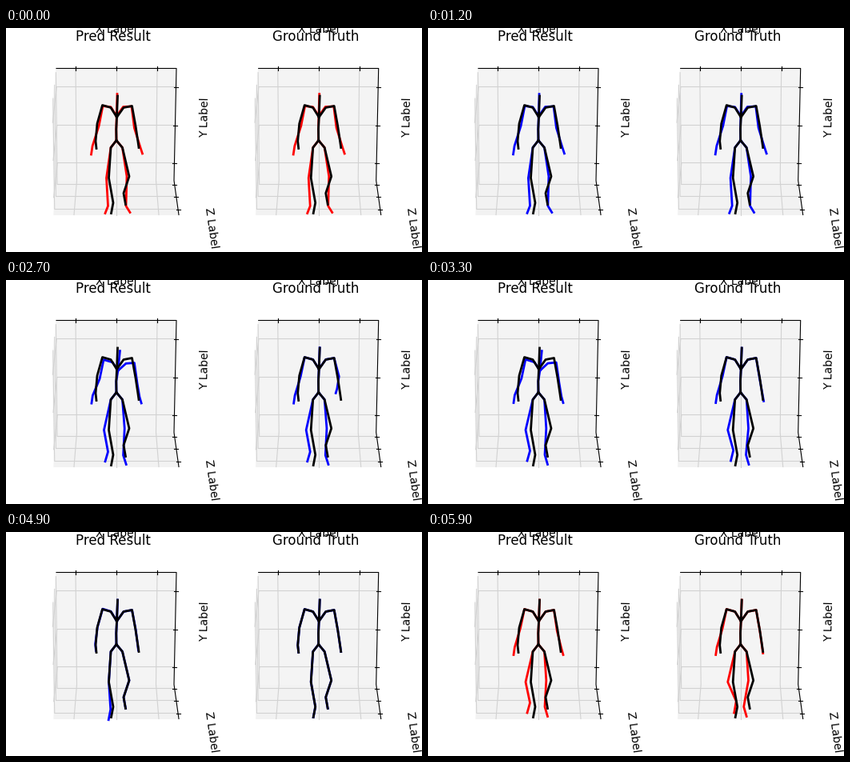
Write a matplotlib script that moves like this. It is 520x280 px and loops after 6 s.

```python
import numpy as np
import matplotlib.pyplot as plt
from matplotlib.animation import FuncAnimation

W, H, DPI = 520, 280, 100
FRAMES, STEP_MS = 60, 100
SHIFT = 252.7  # distance between the two panels

plt.rcParams["font.family"] = "DejaVu Sans"
fig = plt.figure(figsize=(W / DPI, H / DPI), dpi=DPI, facecolor="white")
ax = fig.add_axes([0, 0, 1, 1])
ax.set_xlim(-1, W - 1)
ax.set_ylim(H - 0.5, -0.5)
ax.axis("off")

# Resting skeleton, in pixels of the left panel
REST = {
    "head": (138.5, 84.5), "chest": (137.5, 111), "waist": (136.8, 126),
    "pelvis": (137, 140),
    "l_neck": (130, 99), "l_shoulder": (119.5, 96), "l_elbow": (113, 119),
    "l_wrist": (111, 141), "l_hand": (112, 150),
    "r_neck": (146, 99), "r_shoulder": (156.5, 97), "r_elbow": (161, 122),
    "r_wrist": (164, 142), "r_hand": (165, 149),
    "l_hip": (130, 149), "l_knee": (127.5, 187), "l_ankle": (133, 218),
    "l_foot": (130.5, 231),
    "r_hip": (144.5, 149), "r_knee": (153, 185), "r_ankle": (146, 206),
    "r_foot": (148.5, 220),
}

CHAINS = [["head", "chest", "waist", "pelvis"]]
for s in "lr":
    CHAINS.append(["chest"] + [f"{s}_{j}" for j in
                               ("neck", "shoulder", "elbow", "wrist", "hand")])
    CHAINS.append(["pelvis"] + [f"{s}_{j}" for j in
                                ("hip", "knee", "ankle", "foot")])

# Gestures: how far each joint moves from rest at full strength
STAND = dict(head=(-.5, -2.5), l_shoulder=(.5, 1), r_shoulder=(-.5, .5),
             l_hand=(-6.5, 7.5), r_hand=(4.5, 7.5),
             l_knee=(-3, 0), l_ankle=(-6.5, 4), l_foot=(-7.5, 0),
             r_knee=(-3, 0), r_ankle=(3, 16), r_foot=(5.5, 10))
STRIDE = dict(l_hand=(-6, 3), r_hand=(3, 4),
              l_knee=(-6.5, 0), l_ankle=(-6.5, -5), l_foot=(-7.5, -5.5),
              r_knee=(-6.2, 0), r_ankle=(-1, 12), r_foot=(0, 10))
LEAN = dict(head=(3, 4), l_shoulder=(1.5, 3), r_shoulder=(3, 6))
RAISE = dict(l_shoulder=(2.5, -3.5), l_hand=(-5, -19), r_hand=(-5, -13))
DROP = dict(l_ankle=(-5, 5), l_foot=(-5, 5))
SWING = dict(r_hand=(-10, -13))
CLOSE = dict(r_hand=(-3, -2), l_ankle=(5, -2), l_foot=(6, 0),
             r_ankle=(-4, 0), r_foot=(-4, 0))


def ramp(t, a, b):
    u = np.clip((t - a) / (b - a), 0, 1)
    return u * u * (3 - 2 * u)


def bump(t, mid, half):
    u = np.clip((t - mid) / half, -1, 1)
    return (1 + np.cos(np.pi * u)) / 2


def enter(t):
    return min(t / 28, 1) ** 4


def stride(t):
    return enter(t) * (1 - ramp(t, 35, 49)) + ramp(t, 49, 59)


SHARED = [(STAND, lambda t: 1 - enter(t)), (STRIDE, stride)]
PRED = SHARED + [
    (LEAN, lambda t: ramp(t, 21, 27) * (1 - ramp(t, 30, 48))),
    (RAISE, lambda t: bump(t, 42, 9)),
    (DROP, lambda t: bump(t, 45, 10)),
]
TRUTH = SHARED + [
    (SWING, lambda t: bump(t, 26, 9)),
    (CLOSE, lambda t: ramp(t, 29, 40) * stride(t)),
]


def pose(gestures, t):
    move = {name: np.zeros(2) for name in REST}
    for shifts, strength in gestures:
        for name, d in shifts.items():
            move[name] += strength(t) * np.array(d)
    # The remaining upper joints follow the head, shoulders and hands
    move["chest"] = move["head"] / 2
    for s in "lr":
        shoulder, hand = move[f"{s}_shoulder"], move[f"{s}_hand"]
        move[f"{s}_neck"] = (shoulder + move["head"]) / 2
        move[f"{s}_elbow"] = shoulder + hand * (-0.25, 0.25)
        move[f"{s}_wrist"] = hand * (0.6, 0.8)
    return {name: p + move[name] for name, p in REST.items()}


def skeleton(color, z):
    return [ax.plot([], [], color=color, lw=2, zorder=z,
                    solid_joinstyle="round")[0] for _ in CHAINS]


def place(lines, joints, dx):
    for line, chain in zip(lines, CHAINS):
        pts = np.array([joints[name] for name in chain])
        line.set_data(pts[:, 0] + dx, pts[:, 1])


def room(dx, title):
    """The static box: panes, grid, axes, ticks and labels."""
    def stroke(*pts, color="#d2d2d2", z=2):
        x, y = zip(*pts)
        ax.plot(np.array(x) + dx, y, color=color, lw=0.8, zorder=z)

    def fill(color, *pts):
        ax.fill([x + dx for x, _ in pts], [y for _, y in pts],
                color=color, lw=0.8, zorder=1)

    def label(x, y, text, size=10, **kw):
        ax.text(x + dx, y, text, size=size, ha="center", zorder=6, **kw)

    def grid_row(side, left, right, y):
        stroke(side, (left, y), (right, y))
        stroke((right - 2.5, y), (right + 2.5, y), color="black", z=3)

    fill("#f8f8f8", (62, 50), (57, 95), (59, 233), (63.5, 190))
    fill("#f2f2f2", (63.5, 190), (209, 190), (215, 233), (59, 233))
    fill("#f4f4f4", (62, 50), (212, 50), (209, 190), (63.5, 190))

    for k in (-1, 0, 1):
        top = 137 + 51 * k
        stroke((top, 50), (137 + 49.5 * k, 190), (137 + 53 * k, 233))
        stroke((top, 47.5), (top, 52.5), color="black", z=3)
    for y in (73, 121, 168):
        k = (y - 50) / 140
        grid_row((57 + 2 * k, 95 + 138 * k), 62 + 1.5 * k, 212 - 3 * k, y)
    for y in (195, 210, 226):
        k = (y - 190) / 43
        grid_row((62 - 5 * k, 50 + 45 * k), 63.5 - 4.5 * k, 209 + 6 * k, y)
    stroke((62, 50), (212, 50), (209, 190), (215, 233), color="black", z=3)

    label(133.2, 16, title, size=12, va="baseline")
    label(137, 6, "X Label", va="baseline")
    label(247.6, 111, "Y Label", rotation=88.8, va="center")
    label(255.2, 249.5, "Z Label", rotation=-82, va="center")


panels = []
for dx, title, gestures in ((0, "Pred Result", PRED),
                            (SHIFT, "Ground Truth", TRUTH)):
    room(dx, title)
    place(skeleton("black", 5), REST, dx)
    panels.append((skeleton("red", 4), gestures, dx))


def update(i):
    color = "blue" if 10 <= i < 50 else "red"
    for lines, gestures, dx in panels:
        place(lines, pose(gestures, i), dx)
        for line in lines:
            line.set_color(color)
    return [line for lines, _, _ in panels for line in lines]


anim = FuncAnimation(fig, update, frames=FRAMES, interval=STEP_MS,
                     repeat=True, repeat_delay=0, blit=False)
plt.show()
```
